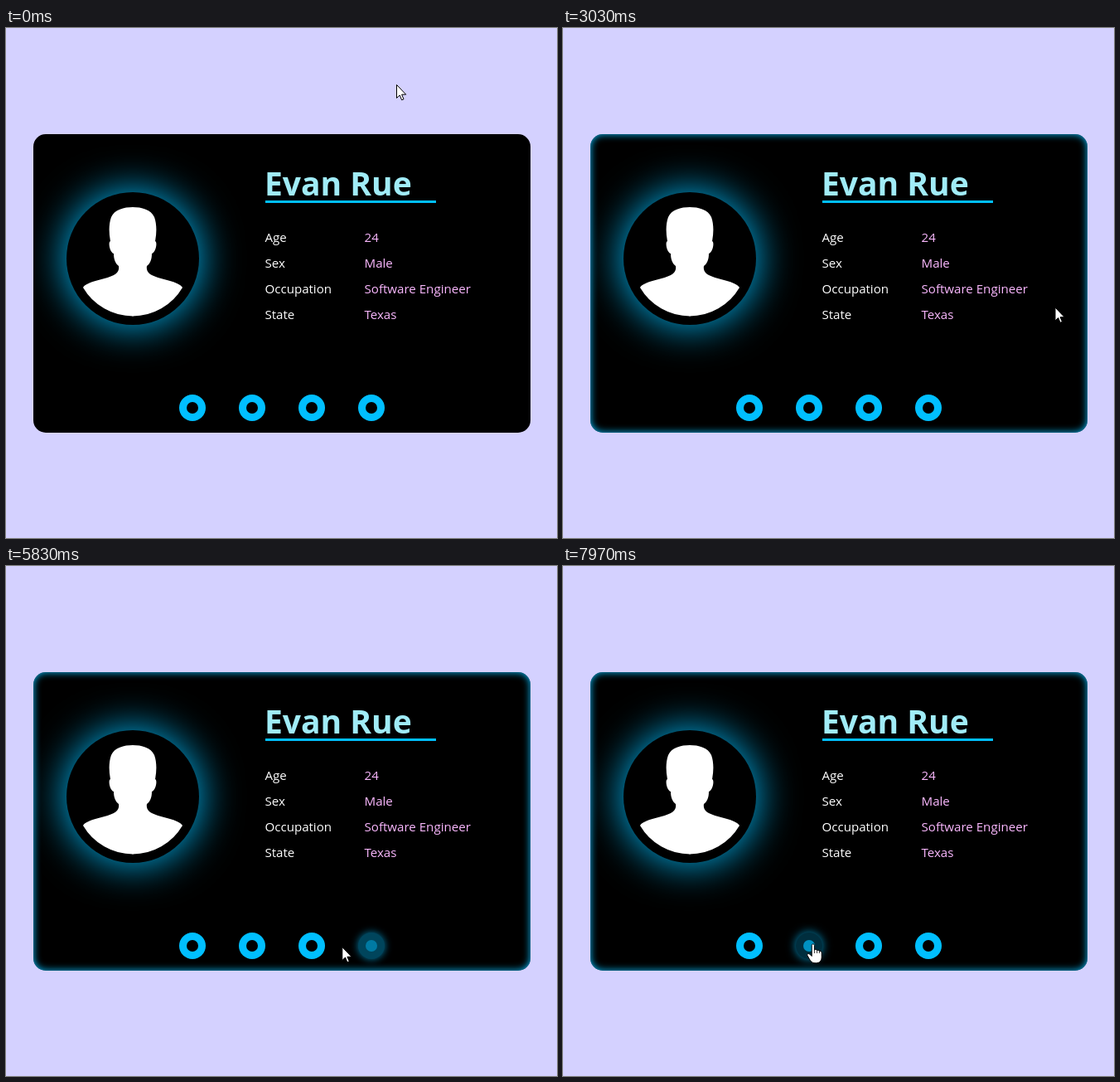
These frames come from a looping animation (665x615 px, 8000 ms). An HTML page:

```html
<!DOCTYPE html>
<html lang="en">
<head>
<meta charset="utf-8">
<title>Profile card</title>
<style>
  html, body { margin: 0; width: 100%; height: 100%; overflow: hidden; background: #d4d1ff; }
  #stage { position: absolute; left: 0; top: 0; width: 665px; height: 615px; overflow: hidden; }
  #card { position: absolute; left: 33px; top: 128px; width: 600px; height: 360px; border-radius: 15px; background: #000; overflow: hidden; }
  #avatar { position: absolute; left: 40px; top: 70px; width: 160px; height: 160px; border-radius: 50%; background: #000; box-shadow: 0 0 50px #00bfff; }
  .button { position: absolute; top: 314px; width: 32px; height: 32px; border-radius: 50%; }
  .button i { position: absolute; left: 9px; top: 9px; width: 14px; height: 14px; border-radius: 50%; }
  svg { position: absolute; left: 0; top: 0; }
  text { font: 15.1px "Open Sans", "Noto Sans", sans-serif; fill: #fff; }
  .value { fill: #fbb8ff; }
  .name { font-size: 39px; font-weight: 700; fill: #a0ecf7; }
</style>
</head>
<body>
<div id="stage">
  <div id="card"><div id="avatar"></div></div>
  <svg width="665" height="615" viewBox="0 0 665 615">
    <g fill="#fff">
      <path id="half" d="M153.500 216C142 216 131 219 127 228C124 236 124 247 126 257C123 258 125 270 130 272C130 279 132 284 136 287C137 292 134 296 130 298C118 304 98 305 93 313A70 70 0 0 0 153.500 347.500Z"/>
      <use href="#half" transform="translate(306 0) scale(-1 1)"/>
    </g>
    <text class="name" x="312" y="202">Evan Rue</text>
    <rect x="313" y="208" width="206" height="3" fill="#00bfff"/>
    <g id="rows"></g>
    <g id="cursor" fill="#fff" stroke="#000" stroke-linejoin="round">
      <path id="arrow" d="M.5 .5V16.500L4.200 13L6.600 18.800L9 17.800L6.600 12.200H11.700Z"/>
      <g id="hand">
        <path d="M-1.700 1.500C-1.700-.6 1.500-.6 1.500 1.500V7C2 5.800 4.500 6 4.700 7.800C5.300 6.800 7.300 7 7.500 8.800C8.300 8 10.300 8.300 10.300 10V15.500C10.300 20 7.800 22.800 3.500 22.800H2C-1.500 22.800-3 20.500-4.500 18L-7 13.600C-7.800 11.600-5.300 10.800-4 12.200L-1.700 14.500Z"/>
        <path fill="none" stroke-width=".8" d="M1.500 7V11M4.700 8V11M7.500 9V11"/>
      </g>
    </g>
  </svg>
</div>
<script>
const LOOP = 8000, STEP = 1000 / 15, FADE = 800;
const CARD_ENTER = 1340;
const FIRST_VISIT = 4400, VISIT_GAP = 1600, VISIT_TIME = 1250, MOVE_TIME = 1000;
const LAST = 3, SPACING = 72;
const $ = id => document.getElementById(id);

const rows = { Age: 24, Sex: "Male", Occupation: "Software Engineer", State: "Texas" };
$("rows").innerHTML = Object.entries(rows).map(([label, value], i) => {
  const y = 258 + 31 * i;
  return `<text x="312.5" y="${y}">${label}</text><text class="value" x="432.5" y="${y}">${value}</text>`;
}).join("");

const buttons = Array.from({ length: LAST + 1 }, (_, i) => {
  const el = document.createElement("div");
  el.className = "button";
  el.style.left = 176 + SPACING * i + "px";
  el.innerHTML = "<i></i>";
  $("card").append(el);
  // The buttons are visited from right to left
  const enter = FIRST_VISIT + VISIT_GAP * (LAST - i);
  return { el, mark: el.firstChild, enter, leave: enter + VISIT_TIME };
});

// Way to the last button: time, x, y
const way = [
  [500, 471, 68], [1433, 589, 158], [2033, 600, 281], [2600, 600, 281],
  [3467, 587, 392], [3833, 532, 442], [FIRST_VISIT, 444.5, 456]
];

const clamp = p => Math.min(1, Math.max(0, p));
const smooth = p => p * p * (3 - 2 * p);
const lerp = (a, b, k) => a + (b - a) * k;

function cursorAt(t) {
  const next = way.findIndex(point => t <= point[0]);
  if (next === 0) return way[0].slice(1);
  if (next > 0) {
    const [t0, x0, y0] = way[next - 1], [t1, x1, y1] = way[next];
    const k = (t - t0) / (t1 - t0);
    return [lerp(x0, x1, k), lerp(y0, y1, k)];
  }
  // Rest on a button, then glide to its left neighbour
  const sinceMove = t - FIRST_VISIT - 900;
  const moves = Math.max(0, Math.floor(sinceMove / VISIT_GAP));
  const k = moves + smooth(clamp((sinceMove - moves * VISIT_GAP) / MOVE_TIME));
  return [444.5 - (SPACING - .7) * k, 456 + 4 * Math.sin(k * Math.PI / 2)];
}

// CSS "ease": cubic-bezier(.25, .1, .25, 1)
function ease(p) {
  p = clamp(p);
  const curve = (a, b, s) => 3 * a * s * (1 - s) ** 2 + 3 * b * s * s * (1 - s) + s ** 3;
  let lo = 0, hi = 1;
  for (let i = 0; i < 20; i++) {
    const mid = (lo + hi) / 2;
    if (curve(.25, .25, mid) < p) lo = mid; else hi = mid;
  }
  return curve(.1, 1, lo);
}

const level = (t, enter, leave) => ease((t - enter) / FADE) - ease((t - leave) / FADE);
const blue = k => `rgb(0,${191 * k},${255 * k})`;
const glow = (blur, k) => `0 0 ${blur * k}px rgba(0,191,255,${k})`;

function draw(time) {
  const t = Math.max(0, (Math.floor((time + 5) / STEP - .5) + .5) * STEP);
  $("card").style.boxShadow = "inset " + glow(10, level(t, CARD_ENTER, LOOP));

  for (const { el, mark, enter, leave } of buttons) {
    const k = level(t, enter, leave);
    el.style.background = blue(1 - k);
    el.style.boxShadow = glow(15, k);
    mark.style.background = blue(k);
  }

  const [x, y] = cursorAt(t);
  const pointing = buttons.some(b => t >= b.enter && t < b.leave);
  $("cursor").setAttribute("transform", `translate(${x} ${y})`);
  $("arrow").style.display = pointing ? "none" : "";
  $("hand").style.display = pointing ? "" : "none";
}

function frame() {
  draw(performance.now() % LOOP);
  requestAnimationFrame(frame);
}
frame();
</script>
</body>
</html>
```
